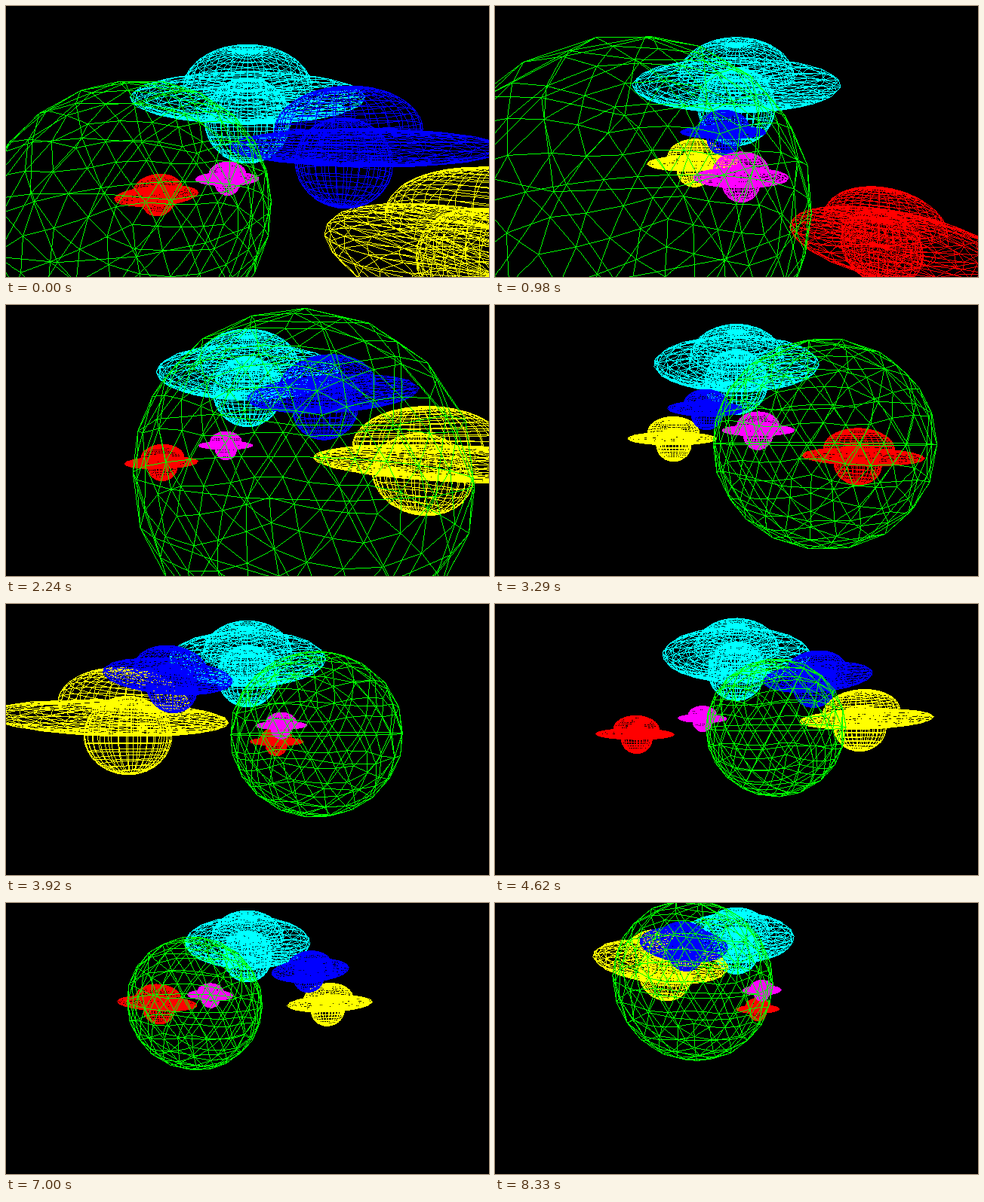
These frames come from a looping animation (640x360 px, 8.4 s). An HTML page with a canvas:

```html
<!DOCTYPE html>
<html lang="en">
<head>
<meta charset="utf-8">
<title>Wireframe saucers</title>
<style>
html, body { margin: 0; width: 100%; height: 100%; overflow: hidden; background: #000; }
canvas { display: block; width: 640px; height: 360px; }
</style>
</head>
<body>
<canvas id="stage" width="640" height="360"></canvas>
<script>
const W = 640, H = 360, FOCAL = 312;
const STEP = 70, STEPS = 120;

const ctx = document.getElementById('stage').getContext('2d');
const image = ctx.createImageData(W, H);
const pixels = new Uint32Array(image.data.buffer);

// Ellipsoid of revolution; `sweep` is the polar angle it covers.
function ellipsoid({ radius, height, offset = 0, cols, rows, sweep = Math.PI, diagonals = false }) {
  const points = [], edges = [];
  for (let i = 0; i <= rows; i++) {
    const polar = sweep * i / rows;
    for (let j = 0; j < cols; j++) {
      const turn = 2 * Math.PI * j / cols;
      const ring = radius * Math.sin(polar);
      points.push([ring * Math.cos(turn), offset - height * Math.cos(polar), ring * Math.sin(turn)]);
      const here = i * cols + j;
      const next = i * cols + (j + 1) % cols;
      if (i > 0) edges.push([here, next]);
      if (i < rows) edges.push([here, here + cols]);
      if (i < rows && diagonals) edges.push([next, here + cols]);
    }
  }
  return { points, edges };
}

// Icosahedron standing on a corner, each face split in four `level` times.
function icosphere(level) {
  const points = [[0, -1, 0]];
  const low = 1 / Math.sqrt(5);
  for (let i = 0; i < 10; i++) {
    const turn = i * Math.PI / 5;
    points.push([2 * low * Math.cos(turn), i % 2 ? low : -low, 2 * low * Math.sin(turn)]);
  }
  points.push([0, 1, 0]);

  let faces = [];
  for (let i = 0; i < 10; i++) {
    const a = 1 + i, b = 1 + (i + 1) % 10, c = 1 + (i + 2) % 10;
    faces.push([a, b, c], [i % 2 ? 11 : 0, a, c]);
  }

  const middles = new Map();
  const key = (a, b) => Math.min(a, b) + '-' + Math.max(a, b);
  function middle(a, b) {
    const k = key(a, b);
    if (!middles.has(k)) {
      const sum = points[a].map((v, i) => v + points[b][i]);
      const length = Math.hypot(...sum);
      middles.set(k, points.push(sum.map(v => v / length)) - 1);
    }
    return middles.get(k);
  }
  for (let i = 0; i < level; i++) {
    faces = faces.flatMap(([a, b, c]) => {
      const ab = middle(a, b), bc = middle(b, c), ca = middle(c, a);
      return [[a, ab, ca], [ab, b, bc], [ca, bc, c], [ab, bc, ca]];
    });
  }

  const edges = new Map();
  for (const [a, b, c] of faces) {
    for (const [p, q] of [[a, b], [b, c], [c, a]]) edges.set(key(p, q), [p, q]);
  }
  return { points, edges: [...edges.values()] };
}

const saucer = [
  ellipsoid({ radius: 1, height: 0.15, cols: 24, rows: 12, diagonals: true }),
  ellipsoid({ radius: 0.59, height: 0.39, offset: -0.13, cols: 32, rows: 12, sweep: Math.PI / 2 }),
  ellipsoid({ radius: 0.4, height: 0.4, offset: 0.14, cols: 32, rows: 16 })
];
const globe = [icosphere(2)];

// Painted in this order; colours are packed as ABGR.
const bodies = [
  { parts: saucer, color: 0xffffff00, size: 90,    orbit: 0,    y: -30,  z: 201, start: 0,      speed: 0.2 },
  { parts: saucer, color: 0xff00ffff, size: 67.5,  orbit: 146,  y: 46,   z: 201, start: 2.361,  speed: 0.2 },
  { parts: saucer, color: 0xffff0000, size: 56.25, orbit: 94,   y: 2.5,  z: 200, start: 2.62,   speed: 0.2 },
  { parts: saucer, color: 0xff0000ff, size: 45,    orbit: 126,  y: 62,   z: 203, start: -0.965, speed: 0.2 },
  { parts: saucer, color: 0xffff00ff, size: 33.5,  orbit: 55,   y: 39.5, z: 202, start: -0.4,   speed: 0.2 },
  { parts: globe,  color: 0xff00ff00, size: 102,   orbit: 81.5, y: 52,   z: 203, start: -Math.PI / 2, speed: 0.06 }
];

// Hard-edged line, one pixel wide.
function line(a, b, color) {
  const dx = b.x - a.x, dy = b.y - a.y;
  const count = Math.max(1, Math.ceil(Math.max(Math.abs(dx), Math.abs(dy))));
  for (let i = 0; i <= count; i++) {
    const x = Math.floor(a.x + dx * i / count);
    const y = Math.floor(a.y + dy * i / count);
    if (x >= 0 && y >= 0 && x < W && y < H) pixels[y * W + x] = color;
  }
}

function drawBody(body, n) {
  const angle = body.start - body.speed * n;
  const sin = Math.sin(angle), cos = Math.cos(angle);
  const cx = body.orbit * sin;
  const cy = body.y - 1.04 * n;
  const cz = body.z + body.orbit * cos + 1.5 * n;
  for (const { points, edges } of body.parts) {
    const flat = points.map(([x, y, z]) => {
      const scale = FOCAL / (cz + body.size * (z * cos - x * sin));
      return {
        x: W / 2 + scale * (cx + body.size * (x * cos + z * sin)),
        y: H / 2 + scale * (cy + body.size * y)
      };
    });
    for (const [a, b] of edges) line(flat[a], flat[b], body.color);
  }
}

let shown = -1;
function tick() {
  const n = Math.floor(performance.now() / STEP) % STEPS;
  if (n !== shown) {
    shown = n;
    pixels.fill(0xff000000);
    for (const body of bodies) drawBody(body, n);
    ctx.putImageData(image, 0, 0);
  }
  requestAnimationFrame(tick);
}
tick();
</script>
</body>
</html>
```
